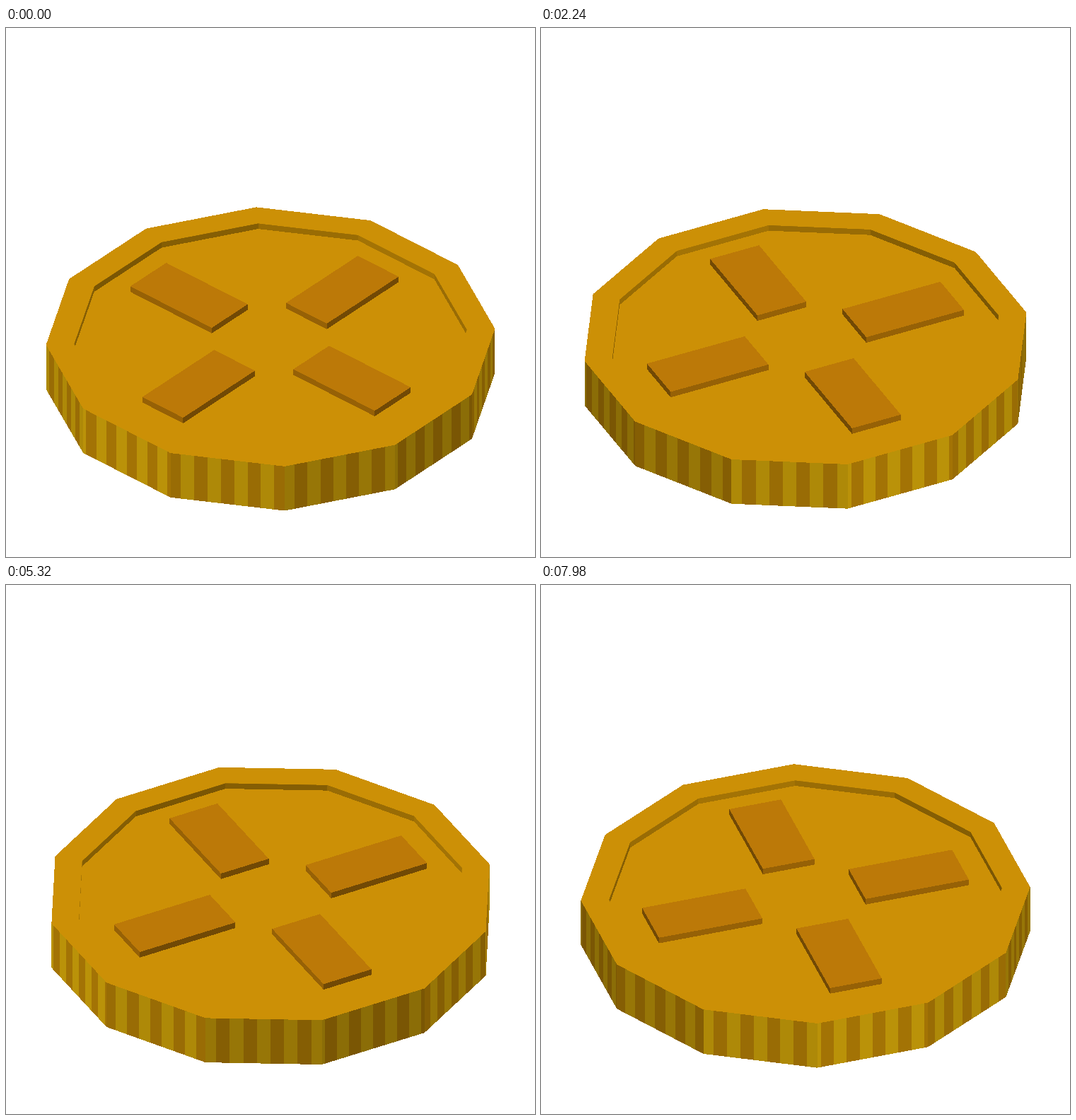
Animation, 748 px wide and 748 px high, one loop 8 s. Source, as an HTML page:

```html
<!DOCTYPE html>
<html lang="en">
<head>
<meta charset="utf-8">
<title>Turning coin</title>
<style>
  html, body { margin: 0; width: 100%; height: 100%; overflow: hidden; background: #fff; }
  svg { display: block; width: 100vw; height: 100vh; }
</style>
</head>
<body>
<svg id="stage" viewBox="0 0 748 748" shape-rendering="crispEdges">
  <clipPath id="dish"><polygon id="rim"/></clipPath>
</svg>
<script>
const NS = 'http://www.w3.org/2000/svg';
const stage = document.getElementById('stage');
const rim = document.getElementById('rim');

const LOOP = 8000, STEP = 70, SPEED = -30 / 1000; // degrees per ms
const UNIT = 19.2, CX = 374, CY = 436.6;
const TILT = 1 / Math.sqrt(3), RISE = Math.sqrt(2 / 3);
const START = 41.4; // coin axis on screen at time zero
const OUTER = 16, INNER = 14, THICK = 4, DEPTH = 0.5;
const GOLD = [204, 144, 6], BRIGHT = [232, 182, 11], COPPER = [188, 121, 8];

const rad = d => d * Math.PI / 180;
const cos = d => Math.cos(rad(d)), sin = d => Math.sin(rad(d));

// Point at distance along a direction, then sideways, at height h
const at = (dir, along, side, h = 0) =>
  [along * cos(dir) - side * sin(dir), along * sin(dir) + side * cos(dir), h];

function project([x, y, h], turn) {
  const c = cos(turn), s = sin(turn);
  const px = CX + UNIT * (x * c - y * s);
  const py = CY + UNIT * ((x * s + y * c) * TILT - h * RISE);
  return px.toFixed(2) + ',' + py.toFixed(2);
}

// Side faces are shaded by the axis they point along
function shade(color, normal) {
  const light = 0.6 + 0.2 * cos(normal - 90) ** 2;
  return color.map(v => v * light);
}

const faces = [];
function face(parent, points, color, normal = null) {
  const el = document.createElementNS(NS, 'polygon');
  const rgb = normal === null ? color : shade(color, normal);
  el.setAttribute('fill', `rgb(${rgb.map(Math.round)})`);
  parent.appendChild(el);
  faces.push({ el, points, normal });
}

function wall(parent, dir, along, from, to, top, bottom, color, normal = dir) {
  face(parent, [at(dir, along, from, top), at(dir, along, to, top),
    at(dir, along, to, bottom), at(dir, along, from, bottom)], color, normal);
}

const ring = apothem => Array.from({ length: 12 }, (_, i) =>
  at(i * 30 + 15, apothem / cos(15), 0));

// Ribbed edge: stripes one unit wide, centred on each facet
const half = OUTER * Math.tan(rad(15));
for (let i = 0; i < 12; i++) {
  const dir = i * 30, kind = i % 3;
  const shift = kind === 0 ? 0 : 0.5;
  const parity = kind === 1 ? 0 : 1;
  wall(stage, dir, OUTER, -half, half, 0, -THICK, GOLD);
  for (let k = -5; k <= 4; k++) {
    if (Math.abs(k % 2) !== parity) continue;
    const a = Math.max(-half, k - shift), b = Math.min(half, k + 1 - shift);
    if (a < b) wall(stage, dir, OUTER, -b, -a, 0, -THICK, BRIGHT);
  }
}

face(stage, ring(OUTER), GOLD);

// Sunken dish
const dish = document.createElementNS(NS, 'g');
dish.setAttribute('clip-path', 'url(#dish)');
stage.appendChild(dish);
const inHalf = INNER * Math.tan(rad(15));
for (let i = 0; i < 12; i++) {
  wall(dish, i * 30, INNER, -inHalf, inHalf, 0, -DEPTH, GOLD, i * 30 + 180);
}

// Four raised bars
for (let dir = 0; dir < 360; dir += 90) {
  wall(stage, dir, 12, -2, 2, 0, -DEPTH, COPPER);
  wall(stage, dir + 180, -4, -2, 2, 0, -DEPTH, COPPER);
  wall(stage, dir + 90, 2, -12, -4, 0, -DEPTH, COPPER);
  wall(stage, dir - 90, 2, 4, 12, 0, -DEPTH, COPPER);
  face(stage, [at(dir, 4, -2), at(dir, 12, -2), at(dir, 12, 2), at(dir, 4, 2)], COPPER);
}

const rimPoints = ring(INNER);
const outline = (points, turn) => points.map(p => project(p, turn)).join(' ');

function draw(ms) {
  const time = Math.floor((ms % LOOP) / STEP) * STEP;
  const turn = START + SPEED * time;
  rim.setAttribute('points', outline(rimPoints, turn));
  for (const { el, points, normal } of faces) {
    const seen = normal === null || sin(normal + turn) > 0;
    el.setAttribute('points', seen ? outline(points, turn) : '');
  }
}

const begin = performance.now();
function tick() {
  draw(performance.now() - begin);
  requestAnimationFrame(tick);
}
draw(0);
requestAnimationFrame(tick);
</script>
</body>
</html>
```
